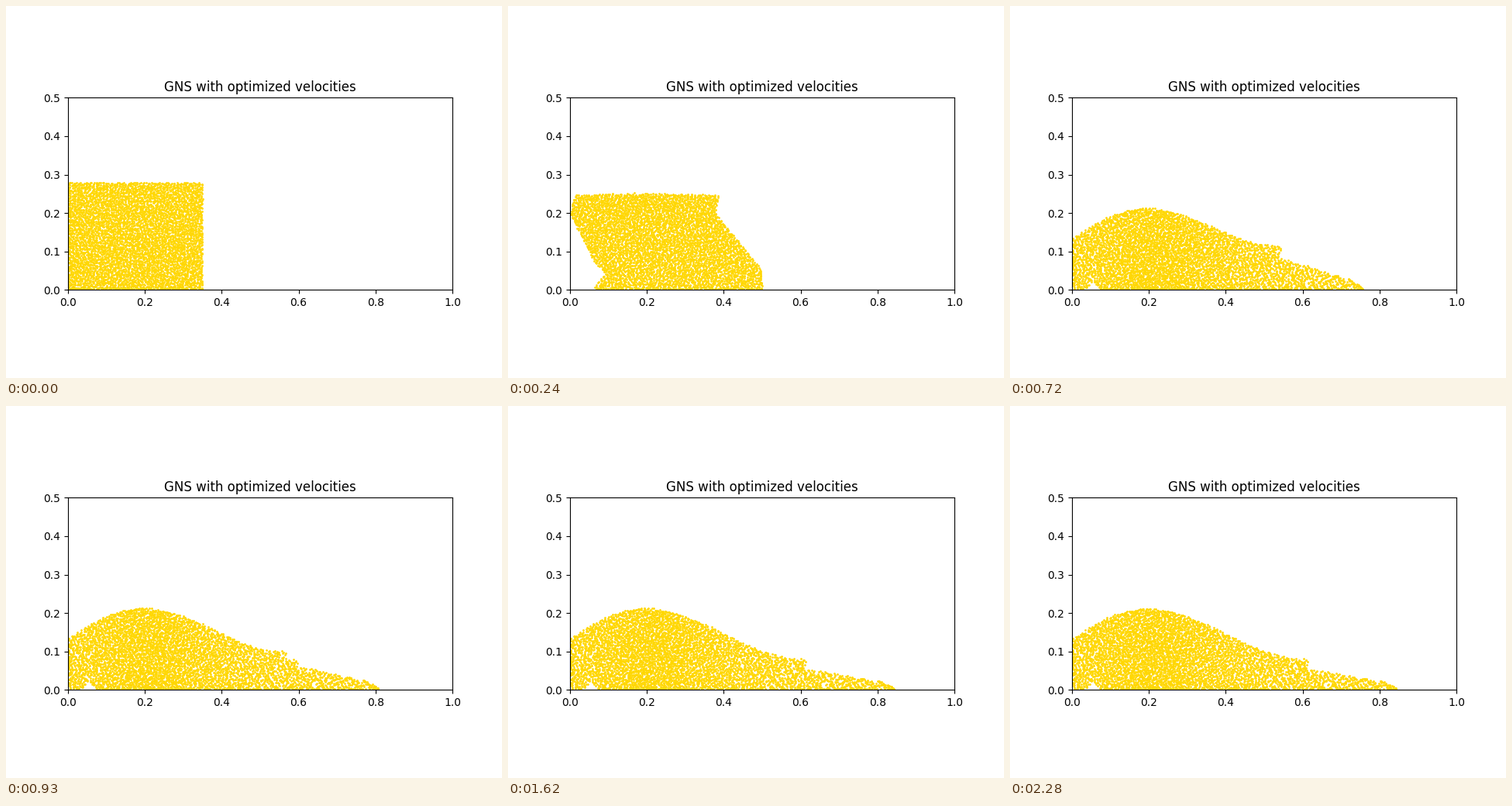
Recreate the animation shown at these times as a matplotlib script. Size 640x480 px, loop 2310 ms.

```python
import numpy as np
import matplotlib.pyplot as plt
from matplotlib.animation import FuncAnimation

FRAMES, STEP = 77, 30
WIDTH, HEIGHT = 0.35, 0.28
COLS, ROWS, STACK = 80, 63, 50
PEAK_X = 0.19
TIMES = np.array([0, 240, 480, 720, 1200, 2280.0])


def sheared(u, v):
    """The block while its layers still slide at different speeds."""
    left = np.interp(v, [0, .18, .3, .8, 1], [.06, .09, .062, 0, .012])
    right = np.interp(v, [0, .2, .82, 1], [.5, .5, .377, .387])
    crown = 0.247 + 0.004 * np.sin(np.pi * u)
    return np.array([left + (right - left) * u, crown * v])


def heap(share, level, wall, peak, corner, top, shoulder, tip, toe=0):
    """Spread the sand under a hump, a step at the corner and a thin tail."""
    def surface(x):
        rise = wall + (peak - wall) * np.sin(np.pi / 2 * x / PEAK_X)
        ease = (1 - np.cos(np.pi * (x - PEAK_X) / (corner - PEAK_X))) / 2
        fall = peak + (top - peak) * ease
        tail = shoulder + (0.016 - shoulder) * (x - corner) / (tip - corner)
        return np.where(x < PEAK_X, rise, np.where(x < corner, fall, tail))

    def floor(x):
        hollow = 0.024 * np.exp(-((x - 0.054) / 0.012) ** 2)
        return hollow + toe * np.clip(1 - x / 0.04, 0, 1)

    # Each particle takes an equal share of the area, densest in the middle.
    xs = np.linspace(0, tip, 1000)
    density = 0.74 + 0.26 * np.exp(-((xs - 0.22) / 0.14) ** 2)
    area = np.cumsum(density * (surface(xs) - floor(xs)))
    x = np.interp(share, area / area[-1], xs)
    low = floor(x)
    return np.array([x, low + (surface(x) - low) * level])


def glide(t):
    """Monotone cubic motion through the key positions."""
    i = np.clip(np.searchsorted(TIMES, t, side="right") - 1, 0, len(TIMES) - 2)
    w = TIMES[i + 1] - TIMES[i]
    s = (t - TIMES[i]) / w
    return ((1 + 2 * s) * (1 - s) ** 2 * keys[i]
            + s * (1 - s) ** 2 * w * speed[i]
            + s * s * (3 - 2 * s) * keys[i + 1]
            + s * s * (s - 1) * w * speed[i + 1])


rng = np.random.default_rng(4)
col, row = np.meshgrid(np.arange(COLS), np.arange(ROWS))
u = ((col + rng.random(col.shape)) / COLS).ravel()
v = ((row + rng.random(row.shape)) / ROWS).ravel()
count = u.size

# Lower layers run ahead; then sort each slanted column by height.
order = np.argsort(u * WIDTH + 0.06 * (1 - v))
share, level = np.empty(count), np.empty(count)
share[order] = (np.arange(count) + 0.5) / count
for start in range(0, count, STACK):
    column = order[start:start + STACK]
    column = column[np.argsort(v[column])]
    n = column.size
    level[column] = (np.arange(n) + rng.random(n)) / n

rest = heap(share, level, .135, .213, .612, .08, .055, .842)
keys = np.array([
    [u * WIDTH, v * HEIGHT],
    sheared(u, v),
    heap(share, level, .152, .217, .46, .168, .125, .65, toe=.055),
    heap(share, level, .135, .213, .542, .115, .083, .757),
    rest,
    rest * [[1.003], [0.995]],
])
slope = np.diff(keys, axis=0) / np.diff(TIMES)[:, None, None]
a, b = slope[:-1], slope[1:]
same = a * b > 0
inner = np.where(same, 2 * a * b / np.where(same, a + b, 1), 0)
speed = np.concatenate([slope[:1], inner, slope[-1:]])
drift = rng.normal(0, 0.001, (2, count))


def positions(t):
    return np.maximum(glide(t) + drift * min(t / 480, 1), 0.002).T


fig, ax = plt.subplots(figsize=(6.4, 4.8), dpi=100)
ax.set_xlim(0, 1)
ax.set_ylim(0, 0.5)
ax.set_aspect("equal")
ax.set_title("GNS with optimized velocities")
sand = ax.scatter(*positions(0).T, s=1, color="gold")


def update(i):
    sand.set_offsets(positions(i * STEP))
    return (sand,)


anim = FuncAnimation(fig, update, frames=FRAMES, interval=STEP, repeat=True)
plt.show()
```
